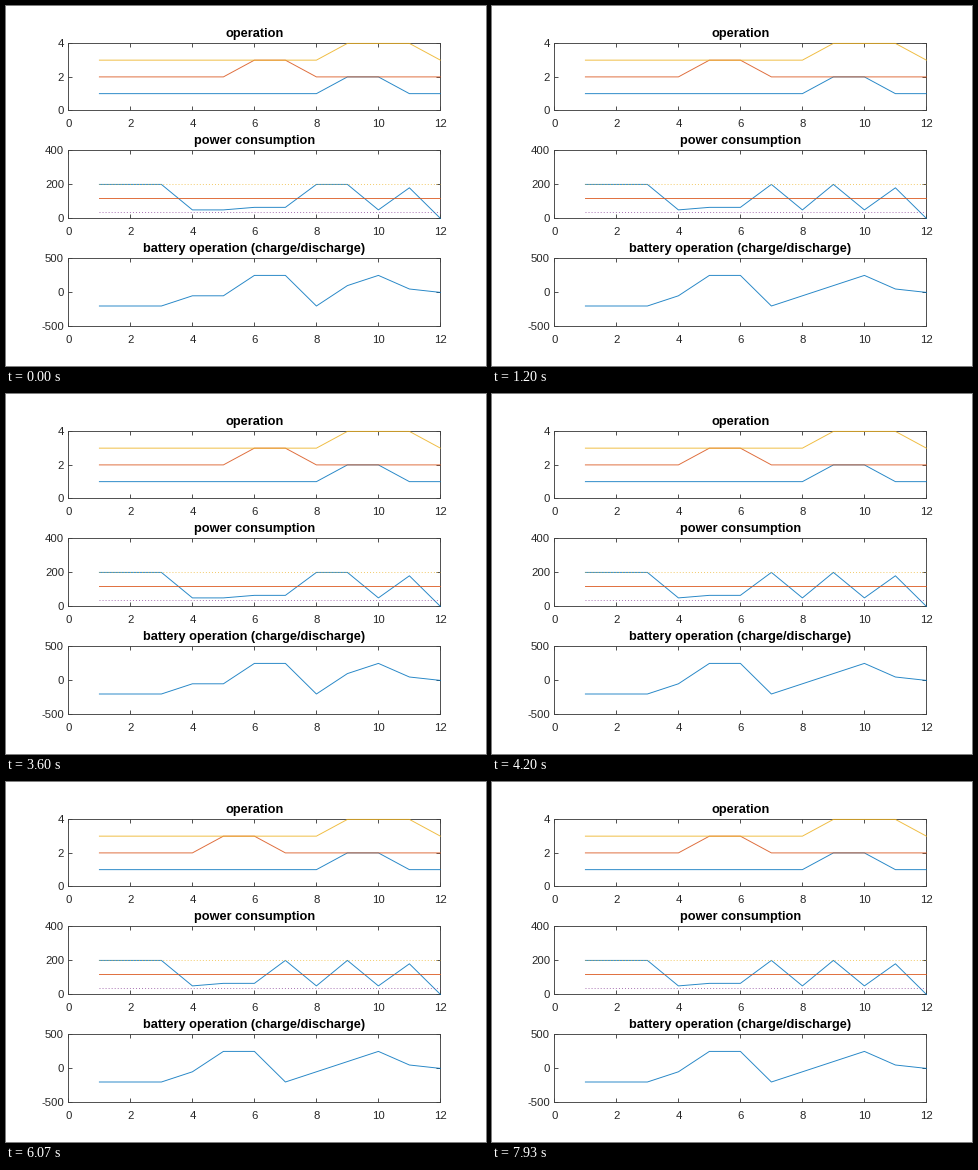
These frames come from a looping animation (480 px wide and 360 px high, 8 s). A matplotlib script:

```python
import matplotlib.pyplot as plt
import numpy as np
from matplotlib.animation import FuncAnimation

WIDTH, HEIGHT, DPI = 480, 360, 80
PX = 72 / DPI  # points per pixel
LEFT, RIGHT = 62.4, 434.4
BLUE, RED, YELLOW, PURPLE = "#0072BD", "#D95319", "#EDB120", "#7E2F8E"
INK, FRAME = "#262626", "#404040"
STEP_MS, PLAN_MS, LOOP_MS = 200, 600, 8000

plt.rcParams["font.family"] = "Liberation Sans"
plt.rcParams["axes.unicode_minus"] = False

hours = np.arange(1, 13)
blue_on = (hours == 9) | (hours == 10)
yellow_on = (hours >= 9) & (hours <= 11)


def schedule(red_start, charge_hour):
    """Red load state, grid power and battery flow for one candidate plan."""
    red_on = (hours == red_start) | (hours == red_start + 1)
    charging = (hours <= 3) | (hours == charge_hour) | (hours == 9)
    grid = np.select([red_on, charging, hours == 11, hours == 12],
                     [65, 200, 180, 0], default=50)
    demand = 315 * red_on + 70 * blue_on + 230 * yellow_on
    return 2 + red_on, grid, demand - grid


def plan_at(now):
    """Every third trial shifts loads later; the second repeats the first."""
    trial = now // PLAN_MS
    shifted = trial % 3 == 0 or trial == 1
    red_start = 6 if shifted and trial != 3 else 5
    return schedule(red_start, 8 if shifted else 7)


fig = plt.figure(figsize=(WIDTH / DPI, HEIGHT / DPI), dpi=DPI, facecolor="white")


def panel(title, top, bottom, ylim, yticks):
    ax = fig.add_axes([LEFT / WIDTH, 1 - bottom / HEIGHT,
                       (RIGHT - LEFT) / WIDTH, (bottom - top) / HEIGHT])
    ax.set(xlim=(0, 12), ylim=ylim, xticks=range(0, 13, 2), yticks=yticks)
    ax.tick_params(direction="in", top=True, right=True, length=3.7 * PX,
                   width=0.9 * PX, color=FRAME, labelcolor=INK,
                   labelsize=11.4 * PX)
    ax.tick_params(axis="x", pad=8.6 * PX)
    ax.tick_params(axis="y", pad=4.4 * PX)
    for spine in ax.spines.values():
        spine.set(linewidth=0.9 * PX, edgecolor=FRAME)
    fig.text((LEFT + RIGHT) / 2 / WIDTH, 1 - (top - 6.4) / HEIGHT, title,
             ha="center", va="baseline", weight="bold", size=12.8 * PX,
             color="black")
    return ax


def curve(ax, values, color, **style):
    style = {"linewidth": 0.95 * PX, "alpha": 0.85, "zorder": 4,
             "clip_on": False, **style}
    return ax.plot(hours, values, color=color, **style)[0]


def level(ax, value, color, **style):
    return curve(ax, np.full(hours.size, value), color, **style)


operation = panel("operation", 37.4, 104.4, (0, 4), (0, 2, 4))
consumption = panel("power consumption", 144.4, 212.4, (0, 400), (0, 200, 400))
storage = panel("battery operation (charge/discharge)", 252.4, 320.4,
                (-500, 500), (-500, 0, 500))

red, grid, battery = plan_at(0)
curve(operation, 1 + blue_on, BLUE)
red_line = curve(operation, red, RED)
curve(operation, 3 + yellow_on, YELLOW)

grid_line = curve(consumption, grid, BLUE)
level(consumption, 120, RED)
dotted = {"linestyle": (0, (1, 2.2)), "alpha": 0.7}
level(consumption, 200, YELLOW, **dotted)
level(consumption, 40, PURPLE, **dotted)

battery_line = curve(storage, battery, BLUE)
lines = red_line, grid_line, battery_line


def update(frame):
    for line, values in zip(lines, plan_at(frame * STEP_MS)):
        line.set_ydata(values)
    return lines


anim = FuncAnimation(fig, update, frames=LOOP_MS // STEP_MS, interval=STEP_MS,
                     repeat=True, repeat_delay=0, blit=False)
plt.show()
```
